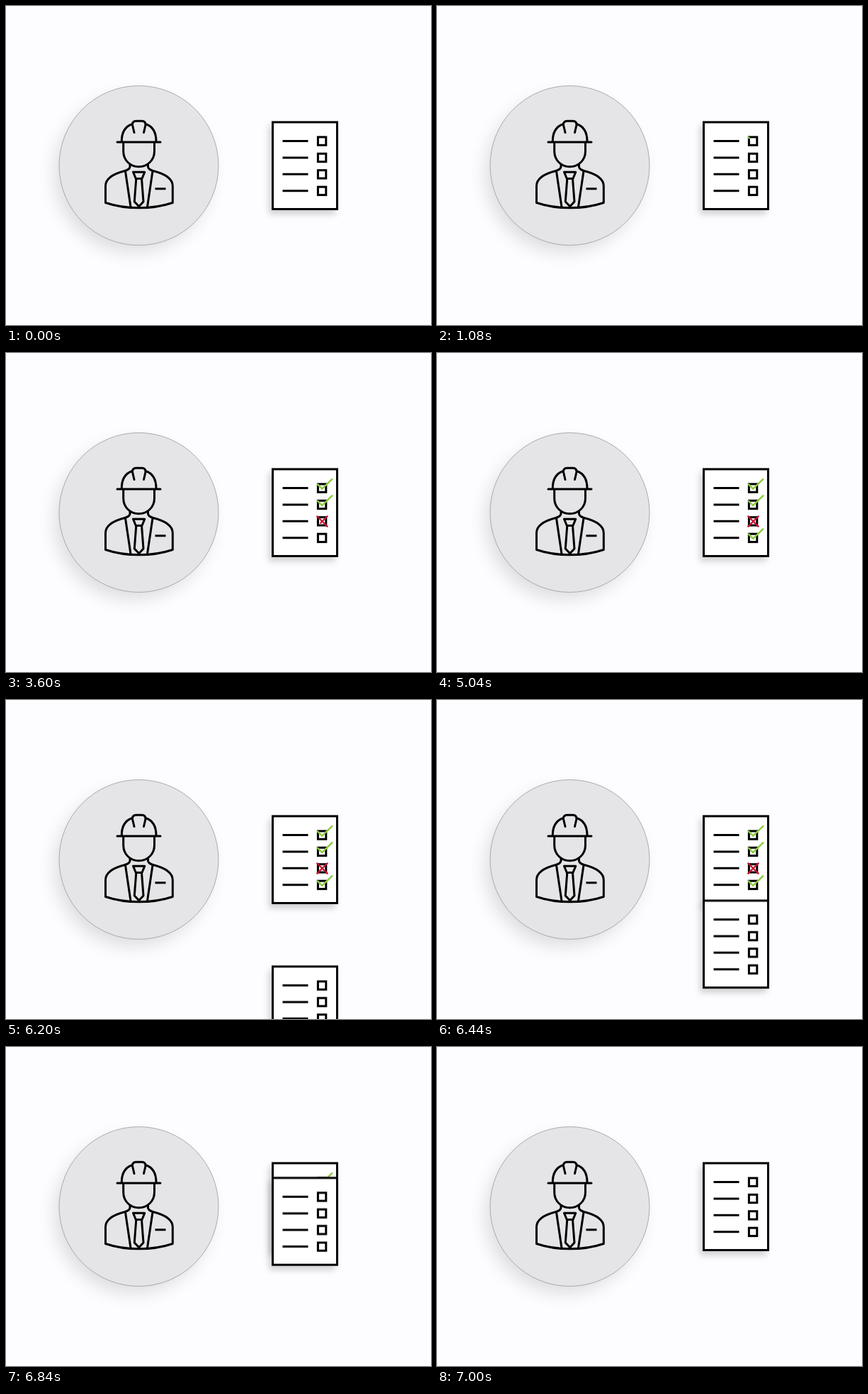
Write an HTML page without scripts that moves like this. It is 600x450 px and loops after 7520 ms.

```html
<!DOCTYPE html>
<html lang="en">
<head>
<meta charset="utf-8">
<title>Checklist</title>
<style>
  html, body { margin: 0; width: 100%; height: 100%; overflow: hidden; background: #fdfcfe; }
  svg { display: block; width: 600px; height: 450px; }
  .ink { fill: none; stroke: #000; stroke-width: 3; }
  .worker { stroke-linecap: round; stroke-linejoin: round; }
  .page { fill: #fff; filter: drop-shadow(-4px 6px 4px rgba(0, 0, 0, .17)); }
  .mark { fill: none; stroke: #8ccb3c; stroke-width: 2.4; stroke-dasharray: 100 200; stroke-dashoffset: 101; }
  .cross { stroke: #c8102e; stroke-width: 2.2; }
  .mark, .marks, .sheet { animation: 7520ms linear infinite; }
  .marks { animation-name: clear; }
  .m1 { animation-name: draw1; }
  .m2 { animation-name: draw2; }
  .m3 { animation-name: draw3; }
  .m4 { animation-name: draw4; }
  .m5 { animation-name: draw5; }
  .sheet { animation-name: rise; }

  /* percentages are ms / 75.2 */
  @keyframes draw1 {
    0%, 13.03% { stroke-dashoffset: 101; animation-timing-function: ease-in-out; }
    18.62%, 100% { stroke-dashoffset: 0; }
  }
  @keyframes draw2 {
    0%, 26.6% { stroke-dashoffset: 101; animation-timing-function: ease-in-out; }
    31.65%, 100% { stroke-dashoffset: 0; }
  }
  @keyframes draw3 {
    0%, 39.89% { stroke-dashoffset: 101; animation-timing-function: ease-in-out; }
    44.95%, 100% { stroke-dashoffset: 0; }
  }
  @keyframes draw4 {
    0%, 44.68% { stroke-dashoffset: 101; animation-timing-function: ease-in-out; }
    49.87%, 100% { stroke-dashoffset: 0; }
  }
  @keyframes draw5 {
    0%, 53.19% { stroke-dashoffset: 101; animation-timing-function: ease-in-out; }
    58.51%, 100% { stroke-dashoffset: 0; }
  }
  @keyframes clear {
    0%, 93.07% { visibility: visible; }
    93.08%, 100% { visibility: hidden; }
  }
  @keyframes rise {
    0%, 79.787% { transform: translateY(300px); animation-timing-function: cubic-bezier(.333, .36, .667, .68); }
    82.447% { transform: translateY(212.5px); animation-timing-function: cubic-bezier(.333, .36, .667, .715); }
    85.638% { transform: translateY(119.5px); animation-timing-function: cubic-bezier(.333, .4, .667, .71); }
    88.83% { transform: translateY(53.7px); animation-timing-function: cubic-bezier(.333, .47, .667, .82); }
    93.07% { transform: translateY(0); }
    93.08%, 100% { transform: translateY(300px); }
  }
</style>
</head>
<body>
<svg viewBox="0 0 600 450">
  <defs>
    <filter id="soft" x="-30%" y="-30%" width="160%" height="160%">
      <feGaussianBlur stdDeviation="13"/>
    </filter>
    <g id="row">
      <path d="M390.5 190.5H426.5"/>
      <rect x="440.4" y="184.9" width="11.4" height="11.4"/>
    </g>
    <g id="list" class="ink">
      <rect class="page" x="376.5" y="163.9" width="91" height="122.6"/>
      <use href="#row"/>
      <use href="#row" y="23.4"/>
      <use href="#row" y="46.8"/>
      <use href="#row" y="70.3"/>
    </g>
    <path id="tick" pathLength="100" d="M439.2 184.6L446.2 191.6L461 177.3"/>
  </defs>

  <rect width="600" height="450" fill="#fdfcfe"/>
  <circle cx="179" cy="237" r="110" fill="#000" opacity=".13" filter="url(#soft)"/>
  <circle cx="187.5" cy="225" r="112.5" fill="#e5e4e6" stroke="#a3a2a4" stroke-width=".9"/>

  <g class="ink worker">
    <path d="M157 192H218"/>
    <path d="M163.3 191C163.3 178 169 169.5 178.5 166.5M212 191C212 178 206.5 169.5 197 166.5"/>
    <path d="M181 178.5L178.3 167Q179 162.3 184 162.3H191.5Q196.5 162.3 197.2 167L194.5 178.5"/>
    <path d="M165.7 193V205C165.7 218 176 226.8 187.5 226.8S209.5 218 209.5 205V193"/>
    <path d="M175 223.5V227Q174.5 230.5 168 232.5C152 236.5 140.5 243 140.5 254V277.5Q162 284.8 187.8 284.8T235.3 277.5V254C235.3 243 223.5 236.5 207.5 232.5Q201 230.5 200.5 227V223.5"/>
    <path d="M168.5 233L176 283.5M207 233L199.5 283.5"/>
    <path d="M179.5 234.2H195.8L192 243.5H183.3Z"/>
    <path d="M183.8 243.5L181.3 276L187.7 282.8L194 276L191.5 243.5"/>
    <path d="M212 257.8H224" stroke-linecap="square"/>
  </g>

  <use href="#list"/>
  <g class="marks">
    <use class="mark m1" href="#tick"/>
    <use class="mark m2" href="#tick" y="23.4"/>
    <path class="mark cross m3" pathLength="100" d="M438.6 229.7L454.3 245.4"/>
    <path class="mark cross m4" pathLength="100" d="M454.3 229.7L438.6 245.4"/>
    <use class="mark m5" href="#tick" y="70.3"/>
  </g>
  <g class="sheet"><use href="#list"/></g>
</svg>
</body>
</html>
```
